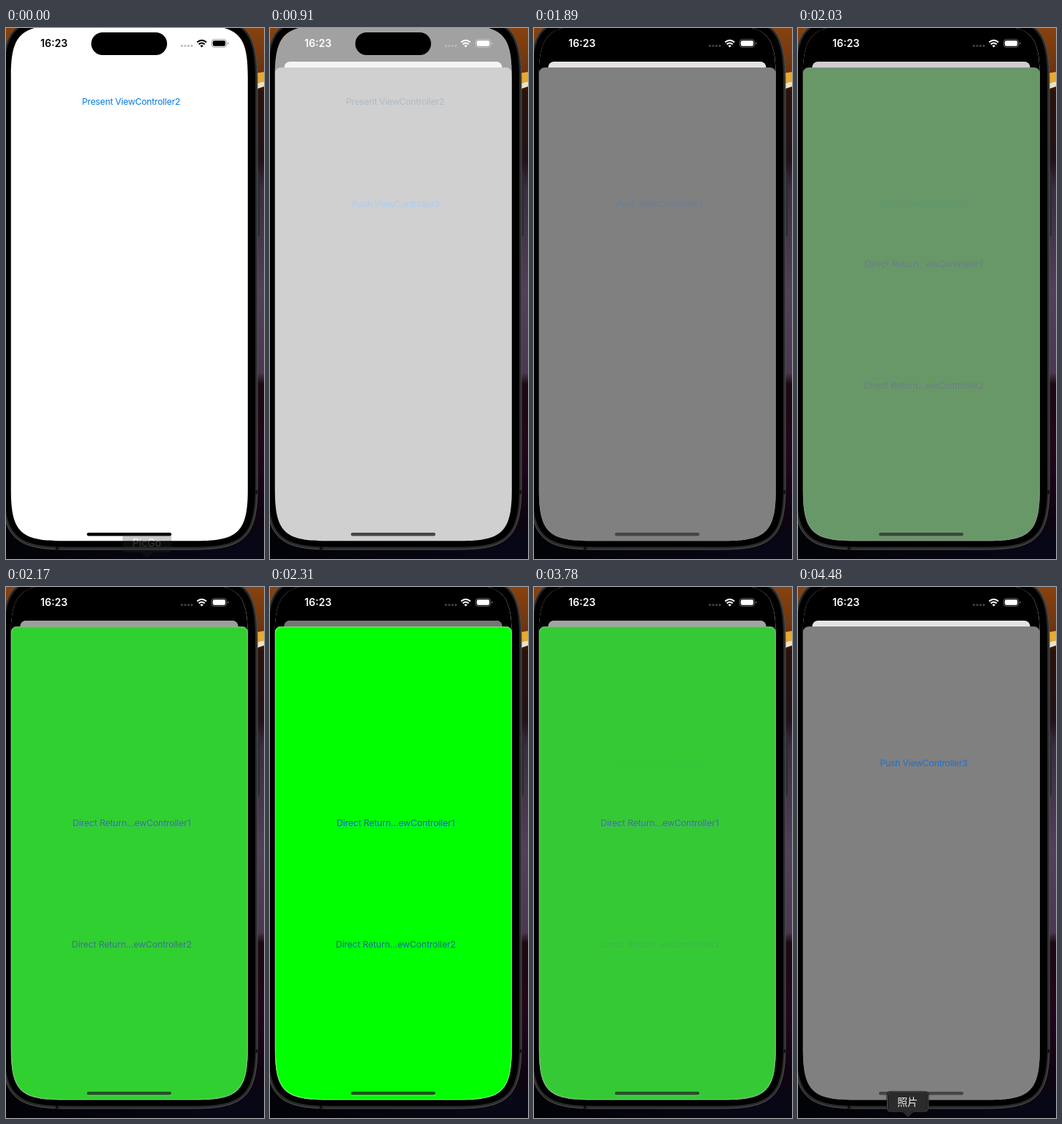
Recreate the animation shown at these times as an HTML page. Size 354 px wide and 726 px high, loop 4.62 s.

```html
<!DOCTYPE html>
<html lang="en">
<head>
<meta charset="utf-8">
<title>Present and push</title>
<style>
  html, body { margin: 0; width: 100%; height: 100%; overflow: hidden; background: #000; }
  svg { display: block; width: 100vw; height: 100vh; }
  text { font-family: Inter, "Noto Sans CJK SC", "Noto Sans CJK", sans-serif; text-anchor: middle; }
  .btn { font-size: 12.3px; letter-spacing: -.27px; }
  .long { letter-spacing: -.15px; }

  /* One loop is 66 ticks of 70 ms; every change is a hard step. */
  .a { animation: 4620ms step-end infinite; }
  #dockFade { animation-name: dockFade; }
  #dockTip { animation-name: dockTip; }
  #present { animation-name: present; }
  #modal { animation-name: modal; }
  #status { animation-name: status; }
  #bar { animation-name: bar; }
  #push { animation-name: push; }
  #pushed { animation-name: pushed; }
  #back2 { animation-name: back2; }

  @keyframes dockFade { 0% { opacity: .25 } 1.51%, 100% { opacity: 0 } }
  @keyframes dockTip { 0% { opacity: 0 } 96.96%, 100% { opacity: 1 } }
  @keyframes present {
    0% { opacity: 1; fill: #0a7ae0 }
    16.66%, 100% { opacity: .36; fill: #6c9fc8 }
  }
  @keyframes modal {
    0% { opacity: 0 }
    16.66% { opacity: .03 }
    18.18% { opacity: .16 }
    19.69% { opacity: .37 }
    21.21% { opacity: .58 }
    22.72% { opacity: .8 }
    24.24%, 100% { opacity: 1 }
  }
  @keyframes status { 0% { color: #000 } 18.18%, 100% { color: #fff } }
  @keyframes bar { 0% { fill: #000 } 18.18%, 100% { fill: #464646 } }
  @keyframes push {
    0% { opacity: 1 }
    40.9% { opacity: .2 }
    43.93% { opacity: .1 }
    45.45% { opacity: 0 }
    80.3% { opacity: .2 }
    86.36% { opacity: .5 }
    87.87% { opacity: .78 }
    89.39%, 100% { opacity: 1 }
  }
  @keyframes pushed {
    0% { opacity: 0 }
    43.93% { opacity: .19 }
    45.45% { opacity: .41 }
    46.96% { opacity: .63 }
    48.48% { opacity: .84 }
    49.99% { opacity: 1 }
    77.27% { opacity: .98 }
    78.78% { opacity: .9 }
    80.3% { opacity: .78 }
    81.81% { opacity: .58 }
    83.33% { opacity: .37 }
    84.84% { opacity: .17 }
    86.36% { opacity: .05 }
    87.87% { opacity: .02 }
    89.39%, 100% { opacity: 0 }
  }
  @keyframes back2 { 0% { opacity: 1 } 75.75%, 100% { opacity: .2 } }
</style>
</head>
<body>
<svg viewBox="0 0 354 726" preserveAspectRatio="none">
  <defs>
    <linearGradient id="desk" x1="0" y1="0" x2="0" y2="1">
      <stop offset="0" stop-color="#87420f"/>
      <stop offset=".08" stop-color="#6d350f"/>
      <stop offset=".12" stop-color="#2a120b"/>
      <stop offset=".25" stop-color="#20121a"/>
      <stop offset=".3" stop-color="#3a2d40"/>
      <stop offset=".5" stop-color="#4f4158"/>
      <stop offset=".65" stop-color="#4a3850"/>
      <stop offset=".67" stop-color="#1d0812"/>
      <stop offset=".8" stop-color="#22061a"/>
      <stop offset=".93" stop-color="#0d0410"/>
      <stop offset=".97" stop-color="#070716"/>
    </linearGradient>
    <linearGradient id="shade">
      <stop offset="0" stop-color="#020306"/>
      <stop offset="1" stop-color="#020306" stop-opacity="0"/>
    </linearGradient>
    <path id="glass" d="M6.8 66.4V631.2c0 57 13 70 70 70H261.8c57 0 70-13 70-70V66.4c0-57-13-70-70-70H76.8c-57 0-70 13-70 70z"/>
    <path id="sheet" d="M6.8 62a8 8 0 0 1 8-8H323.8a8 8 0 0 1 8 8V631.2c0 57-13 70-70 70H76.8c-57 0-70-13-70-70z"/>
    <path id="behind" d="M19.5 60V54a8 8 0 0 1 8-8H310.5a8 8 0 0 1 8 8V60z"/>
    <rect id="home" x="111" y="690" width="116" height="4.4" rx="2.2"/>
    <text id="label1" class="btn long" x="172.5" y="327.2">Direct Return…ewController1</text>
    <text id="label2" class="btn long" x="172.5" y="492.5">Direct Return…ewController2</text>
    <clipPath id="inGlass"><use href="#glass"/></clipPath>
    <clipPath id="inSheet"><use href="#sheet"/></clipPath>
  </defs>

  <!-- desktop -->
  <rect width="354" height="726" fill="url(#desk)"/>
  <path d="M342 62L354 60V73L342 76z" fill="#e9a92c"/>
  <path d="M342 76L354 73V80L342 84z" fill="#efe3c4"/>
  <rect y="640" width="300" height="86" fill="url(#shade)"/>

  <!-- phone body -->
  <rect x="344" y="199" width="4" height="86" rx="1.5" fill="#2b2a2c"/>
  <path d="M-5.5 72V625c0 71 17 88 88 88H257c71 0 88-17 88-88V72c0-71-17-88-88-88H82.5c-71 0-88 17-88 88z" fill="#2a2a2a" stroke="#545454"/>
  <path d="M-2.5 71V625.5c0 68 16 84 84 84H258c68 0 84-16 84-84V71c0-68-16-84-84-84H81.5c-68 0-84 16-84 84z"/>
  <path d="M68 711h4M343 632v5" stroke="#111" stroke-width="4"/>

  <g clip-path="url(#inGlass)">
    <rect width="354" height="726" y="-4" fill="#fff"/>
    <text id="present" class="btn a" x="171.6" y="104.7">Present ViewController2</text>

    <g id="modal" class="a">
      <rect width="354" height="726" y="-4"/>
      <use href="#behind" fill="#e5e1e5"/>
      <use href="#sheet" fill="#808080"/>
      <text id="push" class="btn a" x="172.6" y="244.7" fill="#1a73d2">Push ViewController3</text>
    </g>
    <use id="bar" class="a" href="#home"/>

    <g id="pushed" class="a">
      <use href="#behind" fill="#767476"/>
      <use href="#sheet" fill="#0f0"/>
      <g clip-path="url(#inSheet)">
        <use href="#sheet" fill="none" stroke="#b4dcb4" stroke-width="2.4" stroke-opacity=".6"/>
      </g>
      <use href="#home" x=".6" y="1.4" fill="#8cf58c" opacity=".7"/>
      <use href="#home" fill="#0f5c14"/>
      <use href="#label1" x=".8" y=".9" fill="#2fd8d0" opacity=".8"/>
      <use href="#label1" fill="#067a52"/>
      <g id="back2" class="a">
        <use href="#label2" x=".8" y=".9" fill="#2fd8d0" opacity=".8"/>
        <use href="#label2" fill="#067a52"/>
      </g>
    </g>
  </g>

  <!-- status bar -->
  <rect x="117" y="6" width="104" height="31" rx="15.5"/>
  <g id="status" class="a" fill="currentColor">
    <text x="65.8" y="26.1" font-size="14.1" font-weight="600">16:23</text>
    <g opacity=".25">
      <circle cx="241.3" cy="24.4" r="1.6"/><circle cx="245.9" cy="24.4" r="1.6"/>
      <circle cx="250.4" cy="24.4" r="1.6"/><circle cx="254.9" cy="24.4" r="1.6"/>
    </g>
    <path d="M262.2 19.6Q268.6 13.8 275 19.6M264.5 22.3Q268.6 18.6 272.7 22.3" fill="none" stroke="currentColor" stroke-width="2"/>
    <path d="M266.4 24.2Q268.6 22.2 270.8 24.2L268.6 26.5z"/>
    <rect x="282.2" y="15.7" width="20.4" height="10.6" rx="3.6" fill="none" stroke="currentColor" stroke-opacity=".38"/>
    <rect x="283.7" y="17.2" width="17.4" height="7.6" rx="2.3"/>
    <path d="M304 19.3q1.5.4 1.5 1.7t-1.5 1.7z" opacity=".4"/>
  </g>

  <!-- dock labels -->
  <g id="dockFade" class="a">
    <path d="M164 692H223a4 4 0 0 1 4 4V713a4 4 0 0 1-4 4H201L193.5 724 186 717H164a4 4 0 0 1-4-4V696a4 4 0 0 1 4-4z" fill="#2a2a2a"/>
    <text x="193.2" y="709" font-size="14" fill="#ddd">PicGo</text>
  </g>
  <g id="dockTip" class="a">
    <path d="M126.5 690.5H174.5a4 4 0 0 1 4 4V713a4 4 0 0 1-4 4H158L151 724.5 144 717H126.5a4 4 0 0 1-4-4V694.5a4 4 0 0 1 4-4z" fill="#2b2b2b" stroke="#000" stroke-width="2"/>
    <path d="M126.5 690.8H174.5a4 4 0 0 1 4 4V713a4 4 0 0 1-4 4H158L151 724.2 144 717H126.5a4 4 0 0 1-4-4V694.8a4 4 0 0 1 4-4z" fill="none" stroke="#636363" stroke-width=".9"/>
    <text x="150.3" y="709.3" font-size="14" fill="#eee" lang="zh">照片</text>
  </g>
</svg>
</body>
</html>
```
